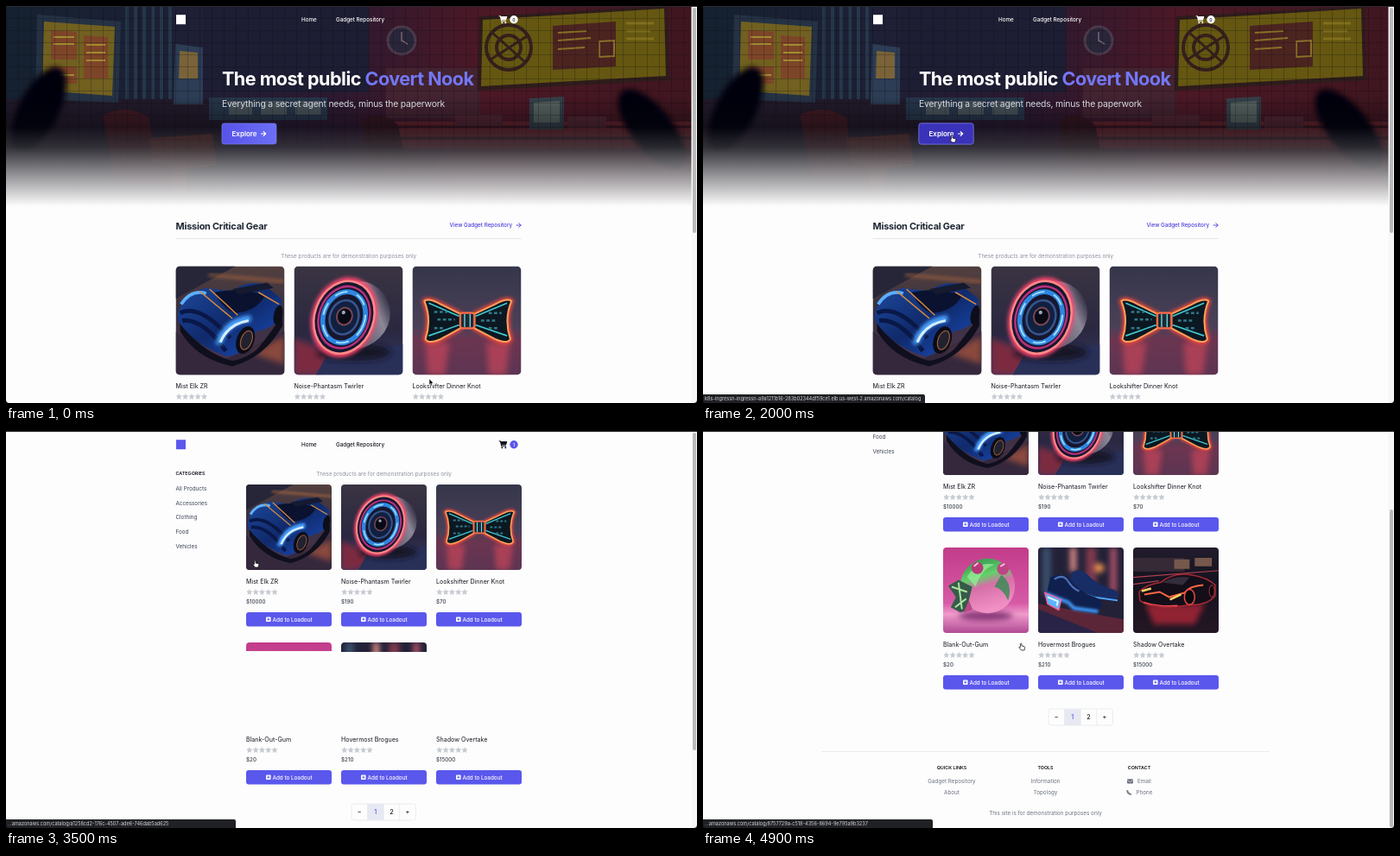
An HTML page for the animation above (5000 ms loop, 800 px wide and 460 px high).

```html
<!DOCTYPE html>
<html lang="en">
<head>
<meta charset="utf-8">
<title>Gadget store tour</title>
<style>
html, body { margin: 0; width: 100%; height: 100%; overflow: hidden; background: #fdfdfd; }
svg { display: block; }
#stage { width: 800px; height: 460px; font-family: Inter, "Open Sans", sans-serif; }
#stage text { white-space: pre; }
.home, .hover, .catalog, .url1, .url2, .arrow, .hand { animation: 5s step-end infinite; }
.home { animation-name: home; }
.catalog { animation-name: catalog; }
.hover { animation-name: hover; }
.url1 { animation-name: url1; }
.url2 { animation-name: url2; }
.arrow { animation-name: arrow; }
.hand { animation-name: hand; }
.cover { animation: load 5s step-end infinite; }
.scroll { animation: scroll 5s infinite; }
.thumb { animation: thumb 5s infinite; }
.cursor { animation: move 5s infinite; }
@keyframes home { 0% { visibility: visible } 62%, 100% { visibility: hidden } }
@keyframes catalog { 0% { visibility: hidden } 62%, 100% { visibility: visible } }
@keyframes hover { 0% { visibility: hidden } 28% { visibility: visible } 62%, 100% { visibility: hidden } }
@keyframes url1 { 0% { visibility: hidden } 68% { visibility: visible } 78%, 100% { visibility: hidden } }
@keyframes url2 { 0% { visibility: hidden } 88%, 100% { visibility: visible } }
@keyframes arrow { 0% { visibility: visible } 28%, 100% { visibility: hidden } }
@keyframes hand { 0% { visibility: hidden } 28%, 100% { visibility: visible } }
@keyframes load {
  0% { transform: translateY(0) }
  70% { transform: translateY(var(--seen)) }
  72%, 100% { transform: translateY(999px) }
}
@keyframes scroll {
  0%, 88% { transform: translateY(0); animation-timing-function: ease-out }
  98%, 100% { transform: translateY(-110px) }
}
@keyframes thumb {
  0%, 88% { transform: translateY(0); animation-timing-function: ease-out }
  98%, 100% { transform: translateY(89px) }
}
@keyframes move {
  0% { transform: translate(490px, 432px); animation-timing-function: steps(8) }
  16% { transform: translate(418px, 177px); animation-timing-function: steps(6) }
  28%, 74% { transform: translate(288px, 150px); animation-timing-function: steps(5) }
  84%, 100% { transform: translate(368px, 246px) }
}
</style>
</head>
<body>
<svg width="0" height="0" style="position:absolute">
  <defs>
    <filter id="soft" x="-30%" y="-30%" width="160%" height="160%"><feGaussianBlur stdDeviation="3"/></filter>
    <filter id="glow" x="-30%" y="-30%" width="160%" height="160%"><feGaussianBlur stdDeviation="1.6"/></filter>
    <linearGradient id="wall">
      <stop offset="0" stop-color="#152130"/><stop offset=".25" stop-color="#1d2036"/>
      <stop offset=".48" stop-color="#2c1930"/><stop offset=".7" stop-color="#4c1826"/><stop offset="1" stop-color="#3f1620"/>
    </linearGradient>
    <linearGradient id="shade" x2="0" y2="1">
      <stop offset="0" stop-color="#07070d" stop-opacity="0"/><stop offset="1" stop-color="#07070d" stop-opacity=".75"/>
    </linearGradient>
    <linearGradient id="fade" x2="0" y2="1">
      <stop offset="0" stop-color="#fdfdfd" stop-opacity="0"/><stop offset=".25" stop-color="#fdfdfd" stop-opacity=".14"/>
      <stop offset=".6" stop-color="#fdfdfd" stop-opacity=".55"/><stop offset="1" stop-color="#fdfdfd"/>
    </linearGradient>
    <linearGradient id="cta"><stop offset="0" stop-color="#5753e8"/><stop offset="1" stop-color="#6c6ff5"/></linearGradient>
    <linearGradient id="road" x2="0" y2="1">
      <stop offset="0" stop-color="#53403f"/><stop offset=".4" stop-color="#39303f"/><stop offset="1" stop-color="#4a3452"/>
    </linearGradient>
    <linearGradient id="hull" x2="1" y2="1">
      <stop offset="0" stop-color="#1d4aa0"/><stop offset=".5" stop-color="#102a6b"/><stop offset="1" stop-color="#1a51c4"/>
    </linearGradient>
    <linearGradient id="room" x2="0" y2="1">
      <stop offset="0" stop-color="#3a3442"/><stop offset=".6" stop-color="#2a2740"/><stop offset="1" stop-color="#343a66"/>
    </linearGradient>
    <linearGradient id="steel" x2="1"><stop offset="0" stop-color="#2a2436"/><stop offset=".8" stop-color="#8c8797"/><stop offset="1" stop-color="#39344a"/></linearGradient>
    <linearGradient id="hall" x2="0" y2="1">
      <stop offset="0" stop-color="#35364a"/><stop offset=".55" stop-color="#4a4058"/><stop offset=".68" stop-color="#6b3550"/><stop offset="1" stop-color="#5d3553"/>
    </linearGradient>
    <linearGradient id="candy" x2="0" y2="1">
      <stop offset="0" stop-color="#c23c8a"/><stop offset=".65" stop-color="#d65aa6"/><stop offset=".78" stop-color="#f09acb"/><stop offset="1" stop-color="#b04a94"/>
    </linearGradient>
    <linearGradient id="ball" x2=".3" y2="1">
      <stop offset="0" stop-color="#2c8a4a"/><stop offset=".4" stop-color="#63d06a"/><stop offset=".58" stop-color="#d66fa8"/><stop offset="1" stop-color="#f090c4"/>
    </linearGradient>
    <linearGradient id="night" x2="0" y2="1">
      <stop offset="0" stop-color="#221c2c"/><stop offset=".4" stop-color="#15131f"/><stop offset="1" stop-color="#241724"/>
    </linearGradient>
    <pattern id="grid" width="14" height="14" patternUnits="userSpaceOnUse"><path d="M0 .5H14M.5 0V14" stroke="#05060c" stroke-width=".7" opacity=".35"/></pattern>
    <clipPath id="round"><rect width="100" height="100" rx="4"/></clipPath>

    <symbol id="car" viewBox="0 0 100 100"><g clip-path="url(#round)">
      <rect width="100" height="100" fill="url(#road)"/>
      <path d="M0 0H55L0 30Z" fill="#262638"/>
      <path d="M0 60L40 88 100 60V100H0Z" fill="#35283d"/>
      <path d="M70 80L100 64V90Z" fill="#8a4a3c" filter="url(#soft)"/>
      <path d="M30 8L100 14" stroke="#a8643c" stroke-width="2" filter="url(#glow)"/>
      <path d="M4 52Q25 80 52 87Q70 84 80 70L98 46V55Q82 84 52 92Q20 86 4 60Z" fill="#100f1e"/>
      <path d="M2 42Q9 24 28 20L52 23Q62 14 80 16L97 30V47Q88 58 74 60Q66 80 48 83Q18 74 2 50Z" fill="url(#hull)"/>
      <path d="M36 24Q60 19 82 27Q74 42 54 43Q42 38 36 24Z" fill="#0a1230"/>
      <path d="M52 21L84 15 90 20 58 26Z" fill="#151a30"/>
      <path d="M4 43Q22 34 50 66M6 50Q25 48 46 78" fill="none" stroke="#0a1848" stroke-width="4"/>
      <path d="M5 35Q14 21 28 25" fill="none" stroke="#5cb0ff" stroke-width="3"/>
      <path d="M39 72Q46 50 69 48" fill="none" stroke="#4aa2ff" stroke-width="6" filter="url(#glow)"/>
      <path d="M41 70Q48 53 67 50" fill="none" stroke="#d4ecff" stroke-width="2.5"/>
      <path d="M22 23L52 48M31 21L57 45M76 24L95 35" stroke="#d68a3c" stroke-width="1.2"/>
      <ellipse cx="64" cy="68" rx="8" ry="13" transform="rotate(20 64 68)" fill="#0c0c16"/>
      <ellipse cx="65" cy="68" rx="5" ry="9" transform="rotate(20 65 68)" fill="#20222f" stroke="#96593e"/>
      <ellipse cx="94" cy="45" rx="4" ry="9" transform="rotate(12 94 45)" fill="#0d0e1a"/>
    </g></symbol>

    <symbol id="spinner" viewBox="0 0 100 100"><g clip-path="url(#round)">
      <rect width="100" height="100" fill="url(#room)"/>
      <path d="M0 66L45 84 20 100H0Z" fill="#7c2b40" filter="url(#soft)"/>
      <path d="M30 82L100 72V100H20Z" fill="#293058"/>
      <ellipse cx="55" cy="79" rx="34" ry="8" fill="#141225" filter="url(#soft)"/>
      <ellipse cx="55" cy="45" rx="34" ry="31" transform="rotate(-25 55 45)" fill="url(#steel)"/>
      <g transform="rotate(20 46 47)" fill="none">
        <ellipse cx="46" cy="47" rx="27" ry="35" fill="#170f25" stroke="#ff466f" stroke-width="5" filter="url(#glow)"/>
        <ellipse cx="46" cy="47" rx="27" ry="34" fill="#17172e" stroke="#ff8a88" stroke-width="2"/>
        <ellipse cx="46" cy="47" rx="23" ry="29" stroke="#b8307c" stroke-width="2"/>
        <ellipse cx="46" cy="47" rx="19" ry="24" stroke="#2f86e0" stroke-width="4.5"/>
        <ellipse cx="46" cy="47" rx="19" ry="24" stroke="#9ee0ff" stroke-width="1.5" stroke-dasharray="12 9"/>
        <ellipse cx="46" cy="47" rx="13" ry="16" fill="#11203f" stroke="#36558e" stroke-width="2"/>
        <ellipse cx="46" cy="46" rx="7" ry="8" fill="#090a14" stroke="#7a4658" stroke-width="1.5"/>
        <circle cx="44" cy="43" r="1.7" fill="#97a7ba"/>
      </g>
    </g></symbol>

    <symbol id="bow" viewBox="0 0 100 100"><g clip-path="url(#round)">
      <rect width="100" height="100" fill="url(#hall)"/>
      <path d="M12 70H34L30 100H14ZM68 70H90L86 100H70Z" fill="#d8485c" opacity=".6" filter="url(#soft)"/>
      <g id="bowline" stroke-linejoin="round">
        <path d="M11 32Q15 29 26 35L44 44V57L26 67Q15 72 12 67Q18 49 11 32ZM91 32Q87 29 76 35L57 44V57L76 67Q87 72 90 67Q84 49 91 32Z" fill="#ff4a38" stroke="#ff4a38" stroke-width="4" filter="url(#glow)"/>
        <path d="M11 32Q15 29 26 35L44 44V57L26 67Q15 72 12 67Q18 49 11 32ZM91 32Q87 29 76 35L57 44V57L76 67Q87 72 90 67Q84 49 91 32Z" fill="#0b1822" stroke="#ffa05c" stroke-width="1.6"/>
        <path d="M15 34L43 46M15 64L43 54M87 34L58 46M87 64L58 54" stroke="#41c8cf" stroke-width="1.3"/>
        <path d="M20 42H32M23 49H39M20 57H30M70 43H82M63 50H78M70 57H80" stroke="#317886" stroke-width="2" stroke-dasharray="3 2"/>
        <rect x="44" y="43" width="13" height="14" rx="2" fill="#192c38" stroke="#ff6c44" stroke-width="1.8"/>
        <path d="M48 44V56M53 44V56" stroke="#7ee4e6"/>
      </g>
    </g></symbol>

    <symbol id="gum" viewBox="0 0 100 100"><g clip-path="url(#round)">
      <rect width="100" height="100" fill="url(#candy)"/>
      <ellipse cx="50" cy="80" rx="32" ry="6" fill="#8c3a7a" filter="url(#soft)"/>
      <circle cx="52" cy="45" r="32" fill="url(#ball)"/>
      <path d="M28 34Q40 16 60 20Q44 26 38 46Z" fill="#9cf09c" opacity=".7"/>
      <path d="M68 32Q82 42 76 62Q70 48 60 46Z" fill="#318c50" opacity=".8"/>
      <path d="M6 45L18 38 34 46 30 62 34 72 20 76 9 70 15 58Z" fill="#355c49"/>
      <path d="M10 46L28 52M14 70L27 60M18 41L22 72" stroke="#aee4a0" stroke-width="2"/>
      <path d="M30 62L34 73 24 76Z" fill="#c14789"/>
      <circle cx="40" cy="24" r="7" fill="#b83a78"/><circle cx="70" cy="25" r="7" fill="#bd4584"/>
      <path d="M36 22L41 18M67 22L72 19" stroke="#ffb4dc" stroke-width="2"/>
    </g></symbol>

    <symbol id="shoes" viewBox="0 0 100 100"><g clip-path="url(#round)">
      <rect width="100" height="100" fill="#232138"/>
      <g filter="url(#soft)"><path d="M10 0V55" stroke="#3a5270" stroke-width="9"/><path d="M41 0V28" stroke="#e08c88" stroke-width="7"/>
      <path d="M62 0V45" stroke="#803a4e" stroke-width="12"/><path d="M88 0V52" stroke="#b4526c" stroke-width="7"/><circle cx="72" cy="24" r="5" fill="#ff9b50"/></g>
      <path d="M0 66L100 84V100H0Z" fill="#5b2638"/><path d="M0 72L70 100H0Z" fill="#292447"/>
      <path d="M38 30Q48 22 58 32Q70 44 90 50Q98 56 91 61L62 57 37 47Z" fill="#182d65"/>
      <path d="M37 48L65 58 93 62" fill="none" stroke="#4fa6ff" stroke-width="2"/>
      <path d="M14 35Q25 28 36 36Q47 52 69 59Q80 67 70 73Q50 75 35 64L10 54Z" fill="#10204e"/>
      <path d="M19 37Q28 31 34 38Q40 48 48 51" fill="none" stroke="#4d72b8" stroke-width="2"/>
      <path d="M9 54L35 64 42 71 70 75" fill="none" stroke="#3c9cff" stroke-width="4" filter="url(#glow)"/>
      <path d="M8 53L27 61 24 73 11 66Z" fill="#58b5ff" stroke="#f0629b" stroke-width="1.5"/>
      <path d="M11 58L23 63 22 68" fill="none" stroke="#dff3ff" stroke-width="2"/>
    </g></symbol>

    <symbol id="racer" viewBox="0 0 100 100"><g clip-path="url(#round)">
      <rect width="100" height="100" fill="url(#night)"/>
      <path d="M0 12H60V28H0Z" fill="#352a36"/><path d="M48 14H66V25H48ZM72 12H92V22H72Z" fill="#77584c"/>
      <path d="M0 35L100 27M0 43L30 39" stroke="#b24150" stroke-width="1.2"/>
      <path d="M14 66H84L72 90H24Z" fill="#ce2a3c" opacity=".65" filter="url(#soft)"/>
      <path d="M7 52Q16 43 32 41Q47 29 68 32Q87 35 96 44V56Q88 67 69 67L44 70Q18 70 8 62Z" fill="#140e18" stroke="#a52a35" stroke-width="1.5"/>
      <path d="M34 41Q49 32 66 35L58 44Z" fill="#342c3a"/>
      <path d="M13 55L31 52 42 58 60 53Q66 45 82 44" fill="none" stroke="#ff6742" stroke-width="2"/>
      <path d="M10 51L21 48M43 61L56 55" stroke="#ffd366" stroke-width="2.5"/>
      <path d="M12 64Q32 70 52 68" fill="none" stroke="#ff4a50" stroke-width="1.5"/>
      <ellipse cx="66" cy="58" rx="6" ry="9" fill="#09080d" stroke="#e84a46" stroke-width="1.5"/><ellipse cx="92" cy="51" rx="3" ry="7" fill="#09080d" stroke="#a8333d"/>
    </g></symbol>

    <symbol id="hero" viewBox="0 0 794 232">
      <rect width="794" height="232" fill="url(#wall)"/>
      <path d="M140 0V118M150 0V118M160 0V118M170 0V118M180 0V118M190 0V118" stroke="#26374a" stroke-width="4"/>
      <path d="M228 0H420V100H228Z" fill="#1d1d33"/>
      <path d="M0 108H250V232H0Z" fill="#221a2a"/>
      <path d="M36 10L133 18 130 112 34 108Z" fill="#253244"/>
      <path d="M44 18L126 24 123 104 42 98Z" fill="#716020"/>
      <path d="M52 28L82 30V62H52ZM90 34L118 36V84H90ZM52 70H82V90H52Z" fill="#7d4528"/>
      <path d="M55 36H79M55 44H79M93 45H115M93 54H115M93 63H115M55 80H79" stroke="#a18c32" stroke-width="2"/>
      <path d="M196 44L228 48V114H194Z" fill="#2c3d55"/><path d="M201 52L222 54V84H200Z" fill="#7a6339"/>
      <path d="M235 106H372V132H235Z" fill="#263649"/><path d="M258 110H285V126H258ZM295 110H325V126H295ZM335 110H365V126H335Z" fill="#475259"/>
      <path d="M440 72H548V130H440Z" fill="#432330"/>
      <circle cx="458" cy="40" r="16" fill="#29263a" stroke="#4b3a4a" stroke-width="3"/><path d="M458 30V40L465 44" fill="none" stroke="#756670" stroke-width="1.5"/>
      <path d="M548 12L766 0 768 86 546 98Z" fill="#2e1c1c"/>
      <path d="M552 16L762 3 764 81 550 93Z" fill="#655711"/>
      <g fill="none" stroke="#35201c"><circle cx="582" cy="48" r="26" stroke-width="4"/><circle cx="582" cy="48" r="14" stroke-width="4"/><path d="M563 31L601 65M561 62L603 35" stroke-width="3"/></g>
      <path d="M633 23L706 18V70L633 74Z" fill="#4b2420"/><path d="M639 31L672 29M639 40L677 37M639 50L670 48M687 41L704 40V58L687 59Z" fill="none" stroke="#8b7028" stroke-width="2"/>
      <path d="M718 20H750M718 29H746M718 38H750" stroke="#806f1c" stroke-width="3"/>
      <path d="M445 134H794V165H445Z" fill="#68242c"/><path d="M445 140H794M445 153H794" stroke="#3e1722" stroke-width="3"/>
      <path d="M606 107L646 105V143H606Z" fill="#354049"/><path d="M611 112L641 110V135H611Z" fill="#56635f"/>
      <path d="M650 128H695V142H650ZM520 126H575V139H520Z" fill="#512531"/>
      <path d="M112 126Q143 112 166 130L174 180 208 184V210H128Z" fill="#3f1a22"/>
      <path d="M166 153L239 148 244 184 212 190 207 220H195L193 188 168 180Z" fill="#592525"/>
      <path d="M412 132Q435 119 454 138L461 170 500 174V186H468V208H456V186L419 178Z" fill="#34161f"/>
      <rect width="794" height="232" fill="url(#grid)"/>
      <g fill="#050509" filter="url(#soft)"><ellipse cx="38" cy="120" rx="23" ry="54" transform="rotate(27 38 120)"/><ellipse cx="748" cy="143" rx="24" ry="56" transform="rotate(-38 748 143)"/></g>
      <rect y="105" width="794" height="65" fill="url(#shade)"/><rect y="170" width="794" height="62" fill="#07070d" opacity=".75"/>
      <rect y="140" width="794" height="92" fill="url(#fade)"/>
    </symbol>

    <path id="star" d="M3.5 0L4.6 2.3 7 2.6 5.3 4.4 5.7 7 3.5 5.8 1.3 7 1.7 4.4 0 2.6 2.4 2.3Z"/>
    <path id="go" d="M0 0H5M2.7-2.4L5.2 0 2.7 2.4" fill="none" stroke-linecap="round" stroke-linejoin="round"/>
    <g id="cart"><path d="M0 .7H1.6L3 6.2H8.2" fill="none" stroke="currentColor" stroke-width="1.1"/><path d="M1.8 1H9.6L8.4 5.2H2.8Z"/><circle cx="3.6" cy="8.2" r="1"/><circle cx="7.6" cy="8.2" r="1"/></g>
  </defs>
</svg>
<svg id="stage" viewBox="0 0 800 460"></svg>
<script>
const indigo = '#5a57ec', ink = '#14171f', gray = '#6b7280', pale = '#8d92a0', rule = '#e5e7eb';

const text = (x, y, size, str, fill = ink, weight = 400, extra = '') =>
  `<text x="${x}" y="${y}" font-size="${size}" fill="${fill}" font-weight="${weight}" ${extra}>${str}</text>`;
const mid = (x, y, size, str, fill, weight) => text(x, y, size, str, fill, weight, 'text-anchor="middle"');
const box = (x, y, w, h, fill, extra = '') =>
  `<rect x="${x}" y="${y}" width="${w}" height="${h}" fill="${fill}" ${extra}/>`;
const use = (id, x, y, extra = '') => `<use href="#${id}" x="${x}" y="${y}" ${extra}/>`;
const photo = (id, x, y, size) => use(id, x, y, `width="${size}" height="${size}"`);
const stars = (x, y) => [0, 1, 2, 3, 4].map(i => use('star', x + i * 7.3, y, 'fill="#c8ccd3"')).join('');

const goods = [
  ['car', 'Mist Elk ZR', 10000], ['spinner', 'Noise-Phantasm Twirler', 190], ['bow', 'Lookshifter Dinner Knot', 70],
  ['gum', 'Blank-Out-Gum', 20], ['shoes', 'Hovermost Brogues', 210], ['racer', 'Shadow Overtake', 15000]
];
const note = 'These products are for demonstration purposes only';

const nav = (color, mark, badge, digit, count) =>
  box(197, 10.2, 11, 11, mark) +
  text(342, 18.3, 6.3, 'Home', color, 500) + text(382, 18.3, 6.3, 'Gadget Repository', color, 500) +
  use('cart', 570.7, 11, `fill="${color}" color="${color}"`) +
  `<circle cx="588" cy="15.7" r="4.7" fill="${badge}"/>` + mid(588, 17.7, 5.2, count, digit, 500);

const explore = (fill, edge) => box(250, 136, 63, 24, fill, `rx="2.5" stroke="${edge}" stroke-width=".7"`) +
  text(261.5, 151, 8, 'Explore', '#fff', 600) + use('go', 295.5, 148, 'stroke="#fff" stroke-width="1.2"');

const homeCard = ([id, name], i) => {
  const x = 196.5 + i * 137;
  return photo(id, x, 301.5, 126) + text(x, 443, 7.1, name) + stars(x + .3, 449);
};

const home = () =>
  use('hero', 0, 0, 'width="794" height="232"') + nav('#fff', '#fff', '#fff', ink, 0) +
  text(250, 92.3, 21.6, 'The most public <tspan fill="#7377f5">Covert Nook</tspan>', '#fff', 700, 'letter-spacing="-.54"') +
  text(250, 117.3, 10.4, 'Everything a secret agent needs, minus the paperwork', '#d5d7e0', 400, 'letter-spacing="-.2"') +
  explore('url(#cta)', '#7a7cf0') + `<g class="hover">${explore('#3a32b8', '#7472dc')}</g>` +
  text(196.5, 258.6, 10.9, 'Mission Critical Gear', '#1f2733', 700, 'letter-spacing="-.22"') +
  text(513.5, 256.3, 6.3, 'View Gadget Repository', '#4a3fdb', 500) + use('go', 591, 254, 'stroke="#4a3fdb" stroke-width=".9"') +
  box(196.5, 269, 400, .8, '#dfe1e6') + mid(396.7, 291.7, 6.3, note, pale) +
  goods.slice(0, 3).map(homeCard).join('');

const card = ([id, name, price], i) => {
  const col = i % 3, x = 278 + col * 110, y = 62 + (i > 2 ? 183 : 0);
  const cover = i > 2 ? box(x - 1, y - 1, 101, 101, '#fdfdfd', `class="cover" style="--seen:${[11, 12, 0][col]}px"`) : '';
  return photo(id, x, y, 99) + (cover && `<svg x="0" y="${y - 1}" width="800" height="101" viewBox="0 ${y - 1} 800 101">${cover}</svg>`) +
    text(x, y + 114.5, 7.1, name) + stars(x + .3, y + 121) + text(x, y + 138.3, 6.3, '$' + price, '#1f2733') +
    box(x, y + 148, 99, 16.5, indigo, 'rx="3"') + box(x + 23, y + 153.4, 5.6, 5.6, '#fff', 'rx="1"') +
    `<path d="M${x + 24.2} ${y + 156.2}h3.2m-1.6-1.6v3.2" stroke="${indigo}" stroke-width=".9"/>` +
    text(x + 30.5, y + 158.5, 6.3, 'Add to Loadout', '#fff', 500);
};

const pager = () =>
  box(400, 432, 74.5, 19, '#fdfdfd', `rx="3" stroke="${rule}" stroke-width=".8"`) + box(418.5, 432.2, 18.7, 18.6, '#e6e9f2') +
  `<path d="M418.5 432v19M437.2 432v19M455.7 432v19" stroke="${rule}" stroke-width=".7"/>` +
  [['−', ink], ['1', indigo], ['2', ink], ['+', ink]].map(([s, c], i) => mid(409.2 + i * 18.6, 444, 7.2, s, c, 500)).join('');

const links = (x, title, ...rows) =>
  mid(x, 502, 5.4, title, ink, 600) + rows.map((s, i) => mid(x, 518 + i * 13, 6.3, s, gray)).join('');

const footer = () =>
  box(137, 481, 519, .8, rule) + links(288, 'QUICK LINKS', 'Gadget Repository', 'About') +
  links(396.5, 'TOOLS', 'Information', 'Topology') + links(505, 'CONTACT') +
  text(503, 518, 6.3, 'Email', gray) + text(501.5, 531, 6.3, 'Phone', gray) +
  box(491, 513.2, 7, 5.2, gray, 'rx=".8"') + '<path d="M491 514.4l3.5 2.3 3.5-2.3" fill="none" stroke="#fdfdfd" stroke-width=".6"/>' +
  `<path d="M491.2 526.2Q491.5 530.5 495.8 531" fill="none" stroke="${gray}" stroke-width="1.9"/>` +
  mid(396.5, 555, 6.3, 'This site is for demonstration purposes only', gray);

const catalog = () =>
  nav(ink, indigo, indigo, '#fff', 1) + text(196.5, 51, 5.4, 'CATEGORIES', ink, 600) +
  ['All Products', 'Accessories', 'Clothing', 'Food', 'Vehicles'].map((s, i) => text(196.5, 68.9 + i * 16.65, 6.3, s, '#374151')).join('') +
  mid(437.5, 52.2, 6.3, note, pale) + goods.map(card).join('') + pager() + footer();

const status = (cls, w, url) =>
  `<g class="${cls}"><path d="M0 450H${w - 2}q2 0 2 2V460H0Z" fill="#202124"/>${text(2, 457.3, 5.57, url, '#d3d5d9')}</g>`;

const thumb = (h, cls) => box(795, 2, 4, h, '#b9b9bb', `rx="2" class="${cls}"`);
const track = box(793.5, 0, 6.5, 460, '#f7f7f8');

document.getElementById('stage').innerHTML =
  box(0, 0, 800, 460, '#fdfdfd') +
  `<g class="home">${home()}${track}${thumb(261, '')}</g>` +
  `<g class="catalog"><g class="scroll">${catalog()}</g>${track}${thumb(368, 'thumb')}</g>` +
  status('hover', 257, 'k8s-ingressn-ingressn-a9a1211b16-283b02344df59ce1.elb.us-west-2.amazonaws.com/catalog') +
  status('url1', 266, '...amazonaws.com/catalog/a1258cd2-176c-4507-ade6-746dab5ad625') +
  status('url2', 266, '...amazonaws.com/catalog/8757729a-c518-4356-8694-9e795a9b3237') +
  box(0, 0, 800, 1, '#2a2a2d') +
  '<path d="M0 460V456Q0 460 4 460ZM800 460V456Q800 460 796 460Z" fill="#15151a"/>' +
  `<g class="cursor" stroke-linejoin="round">
    <path class="arrow" d="M0 0V7L1.6 5.6 2.7 8 3.9 7.4 2.8 5.1H5Z" fill="#000" stroke="#fff" stroke-width=".6"/>
    <path class="hand" d="M-.6 .6Q.2-.6 1 .6V3L4 3.6Q5 4 4.6 5.6L4 8H.4L-2.2 4.8Q-2 3.6-.6 4.6Z" fill="#fff" stroke="#000" stroke-width=".7"/>
  </g>`;
</script>
</body>
</html>
```
